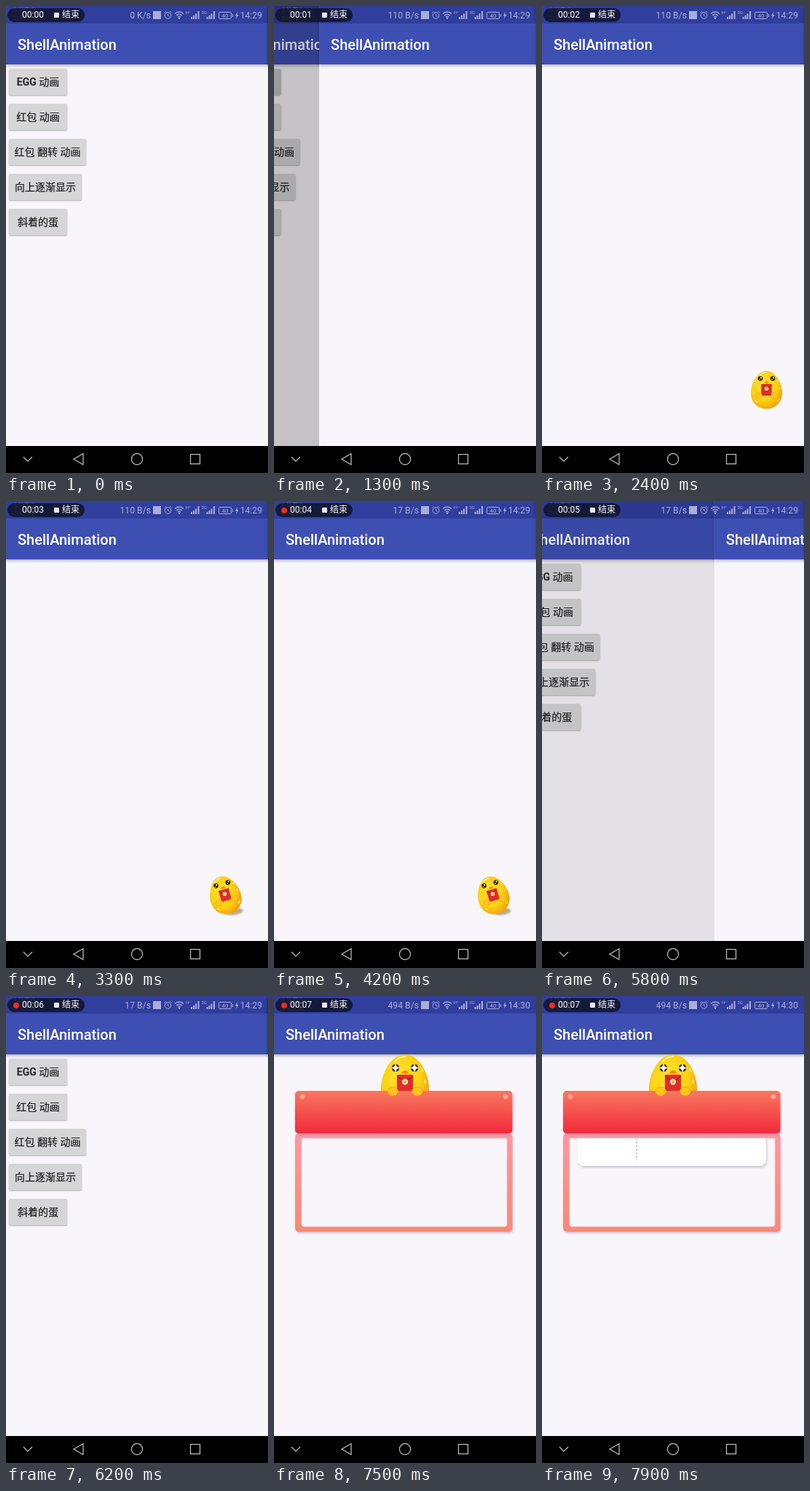
An HTML page that plays this animation: 360x640 px, repeating every 8 s.

```html
<!DOCTYPE html>
<html lang="zh-CN">
<head>
<meta charset="utf-8">
<title>ShellAnimation</title>
<style>
  html, body { margin: 0; width: 100%; height: 100%; overflow: hidden; background: #000; }
  body { font-family: Roboto, "Noto Sans CJK SC", "Noto Sans CJK", sans-serif; }
  #stage { position: relative; width: 360px; height: 640px; overflow: hidden; background: #000; }
  #screen { position: absolute; inset: 0 0 37px; overflow: hidden; }
  svg { position: absolute; left: 0; top: 0; overflow: visible; }

  .page {
    position: absolute; inset: 0; background: #f8f6fa;
    animation: 8s cubic-bezier(.333, .667, .667, 1) infinite;
  }
  .bar { position: absolute; width: 360px; height: 80px; background: #3e4fb3; box-shadow: 0 2px 4px rgba(0, 0, 0, .28); }
  .bar::before { content: ""; position: absolute; width: 100%; height: 24px; background: #303e9d; }
  .bar span { position: absolute; left: 16px; top: 41px; font: 500 20px/24px Roboto, sans-serif; color: #fff; }

  .home { animation-name: recede; }
  .dim { position: absolute; inset: 0; background: #000; animation: dim 8s cubic-bezier(.333, .667, .667, 1) infinite; }
  .egg-page { animation-name: visit; }
  .card-page { animation-name: arrive; }

  .btn {
    position: absolute; left: 4px; width: 80px; height: 36px; border-radius: 2px;
    background: #d6d5d8; color: #1d1d1f; font-size: 14px; font-weight: 500; line-height: 37px;
    text-align: center; white-space: nowrap; box-shadow: 0 1px 2px rgba(0, 0, 0, .3);
    -webkit-text-stroke: .2px #1d1d1f;
  }
  .first { animation: press-first 8s infinite; }
  .second { animation: press-second 8s infinite; }
  .slot { animation: drop 8s linear infinite; }
  .soft { filter: drop-shadow(1px 2px 1.5px rgba(140, 120, 175, .45)); }
  #shade { filter: blur(1px); }

  @keyframes recede {
    0%, 11% { transform: none; }
    20%, 69.4% { transform: translateX(-90px); }
    76.9%, 82% { transform: none; }
    91.5%, 100% { transform: translateX(-90px); }
  }
  @keyframes dim {
    0%, 11% { opacity: 0; }
    20%, 69.4% { opacity: .25; }
    76.9%, 82% { opacity: 0; }
    91.5%, 100% { opacity: .25; }
  }
  @keyframes visit {
    0%, 11% { transform: translateX(360px); }
    20%, 69.4% { transform: none; }
    76.9%, 100% { transform: translateX(360px); }
  }
  @keyframes arrive {
    0%, 82% { transform: translateX(360px); }
    91.5%, 100% { transform: none; }
  }
  @keyframes press-first {
    0%, 8.5% { background: #d6d5d8; }
    11%, 22% { background: #c4c3c6; }
    25%, 100% { background: #d6d5d8; }
  }
  @keyframes press-second {
    0%, 79.5% { background: #d6d5d8; }
    82%, 100% { background: #c4c3c6; }
  }
  @keyframes drop {
    0%, 93.75% { transform: translateY(-32px); }
    100% { transform: translateY(19px); }
  }

  .status { position: absolute; top: 5px; font: 12.2px/16px Roboto, sans-serif; color: #a9afd7; white-space: nowrap; }
  #speed { right: 161px; }
  #hour { right: 8px; }
  .carrier { position: absolute; left: 9px; top: 2px; font-size: 8px; line-height: 10px; color: #8d8f9f; }
  #pill {
    position: absolute; left: 2px; top: 3px; width: 106px; height: 19px; border-radius: 10px;
    background: rgba(17, 20, 42, .86); color: #fff; font-size: 12px; line-height: 19px;
  }
  #pill > * { position: absolute; }
  #dot { left: 8px; top: 5.5px; width: 8px; height: 8px; border-radius: 50%; background: #f3291f; }
  #clock { left: 20px; }
  .stop { left: 64px; top: 6px; width: 7px; height: 7px; border-radius: 1px; background: #e8e8ee; }
  .end { left: 75px; }
</style>
</head>
<body>
<div id="stage">
  <svg width="0" height="0">
    <defs>
      <radialGradient id="yolk" cx=".42" cy=".4" r=".62">
        <stop offset="0" stop-color="#ffe52f"/>
        <stop offset=".65" stop-color="#fdd012"/>
        <stop offset="1" stop-color="#f3a30d"/>
      </radialGradient>
      <linearGradient id="red" x2="0" y2="1">
        <stop offset="0" stop-color="#f9785f"/>
        <stop offset="1" stop-color="#f0293b"/>
      </linearGradient>
      <linearGradient id="coral" x2="0" y2="1">
        <stop offset="0" stop-color="#fc989f"/>
        <stop offset="1" stop-color="#f68a77"/>
      </linearGradient>
      <clipPath id="window"><path d="M38 195h282v121H38z"/></clipPath>
      <g id="eye">
        <circle r="3.3" fill="#35200f"/>
        <circle cx="1" cy="-1" r="1.1" fill="#fff"/>
        <circle cx="-1" cy="1.3" r=".7" fill="#fff"/>
      </g>
      <g id="star-eye">
        <circle r="3.4" fill="#35200f"/>
        <path d="M0-4l1.200 2.800L4 0 1.200 1.200 0 4l-1.200-2.800L-4 0l2.800-1.200z" fill="#fff"/>
      </g>
      <g id="paws" fill="#fcc51d" stroke="#e9a116" stroke-width=".5">
        <ellipse cx="-11" cy="7" rx="4.8" ry="4"/>
        <ellipse cx="11" cy="7" rx="4.8" ry="4"/>
      </g>
      <g id="body">
        <path d="M0-26C13-26 21.5-8 21.5 4 21.5 18 12 26 0 26S-21.5 18-21.5 4C-21.5-8-13-26 0-26z" fill="url(#yolk)"/>
        <path d="M-9-20q4-4 9-4M15-13l1 2M17 13l-2 3M-15 15l2 2M18-3v2" fill="none" stroke="#fff3b8" stroke-width="1.2" stroke-linecap="round"/>
        <path d="M-3.500-10q3.500-3.500 7 0-3.500 2.500-7 0z" fill="#f58a13"/>
      </g>
      <g id="packet">
        <rect x="-7.2" y="-8" width="14.4" height="16" rx="1.2" fill="#e02d2e"/>
        <path d="M-7.200-7Q0 1 7.200-7" fill="none" stroke="#a91b20" stroke-width=".8"/>
        <circle cy="-1.6" r="2.7" fill="#fbe6b0"/>
        <circle cy="-1.6" r="1.2" fill="#dfa13c"/>
      </g>
      <g id="egg">
        <use href="#body"/>
        <use href="#eye" x="-8.5" y="-15.500"/>
        <use href="#eye" x="8.5" y="-15.500"/>
        <use href="#packet"/>
        <use href="#paws" x="0" y="1"/>
      </g>
    </defs>
  </svg>

  <div id="screen">
    <div class="page home">
      <div class="bar"><span>ShellAnimation</span></div>
      <div class="btn first" style="top:86px">EGG 动画</div>
      <div class="btn second" style="top:134px">红包 动画</div>
      <div class="btn" style="top:182px;width:106px">红包 翻转 动画</div>
      <div class="btn" style="top:230px;width:100px">向上逐渐显示</div>
      <div class="btn" style="top:278px">斜着的蛋</div>
      <div class="dim"></div>
    </div>

    <div class="page egg-page">
      <div class="bar"><span>ShellAnimation</span></div>
      <svg id="nest" width="360" height="603">
        <ellipse id="shade" rx="13" ry="5" fill="#b39d72"/>
        <use id="hopper" href="#egg"/>
      </svg>
    </div>

    <div class="page card-page">
      <div class="bar"><span>ShellAnimation</span></div>
      <svg width="360" height="603">
        <g transform="translate(180 120) scale(1.535)">
          <use href="#body"/>
          <use href="#star-eye" x="-8.5" y="-14"/>
          <use href="#star-eye" x="8.5" y="-14"/>
          <use href="#packet"/>
        </g>
        <g class="soft">
          <rect x="29" y="188.500" width="298.500" height="134.500" rx="5" fill="url(#coral)"/>
          <path d="M38 195h282v118q0 3-3 3H41q-3 0-3-3z" fill="#f8f6fa" stroke="#e8cfd8"/>
        </g>
        <g clip-path="url(#window)">
          <g class="slot">
            <path class="soft" d="M49 120H308V220q-4 0-4 4H53q0-4-4-4z" fill="#fff"/>
            <path d="M130 120v96" stroke="#b79a9d" stroke-dasharray="3 2"/>
          </g>
        </g>
        <rect class="soft" x="29" y="130" width="298.500" height="58.500" rx="5" fill="url(#red)"/>
        <g fill="#fba99c" stroke="#f58f86">
          <circle cx="39" cy="138" r="3.2"/>
          <circle cx="318" cy="138" r="3.2"/>
        </g>
        <use href="#paws" transform="translate(180 120) scale(1.535)"/>
      </svg>
    </div>
  </div>

  <div class="carrier">本地网络<br>本地网络</div>
  <div id="pill">
    <i id="dot"></i><span id="clock">00:00</span><i class="stop"></i><span class="end">结束</span>
  </div>
  <div class="status" id="speed">0 K/s</div>
  <div class="status" id="hour">14:29</div>

  <svg width="360" height="640" fill="none" stroke="#a9afd7">
    <rect x="202" y="7" width="11" height="11" fill="#a9afd7" stroke="none"/>
    <circle cx="222.5" cy="13" r="4.3"/>
    <path d="M222.5 10.5V13l2 1.5M217.5 9.5l2.5-2.3M227.5 9.5L225 7.2"/>
    <path d="M232 10.5q6-5 12 0M234 13q4-3.4 8 0M236 15.3q2-1.6 4 0" stroke-width="1.3"/>
    <circle cx="238" cy="17" r=".7" fill="#a9afd7"/>
    <path id="bars" d="M255 18v-3M258 18v-5M261 18V10.500M264.500 18V7" stroke-width="2"/>
    <use href="#bars" x="21.5"/>
    <rect x="292.500" y="8.500" width="17" height="9" rx="1"/>
    <path d="M311.500 11v4"/>
    <path d="M318 8l-3 5.500h2l-1 4.500 3.500-6h-2z" fill="#a9afd7" stroke="none"/>
    <g fill="#a9afd7" stroke="none" font-family="Roboto, sans-serif">
      <text x="247" y="11" font-size="6">H⁺</text>
      <text x="268.500" y="11" font-size="6">3G</text>
      <text x="296.500" y="16" font-size="8">40</text>
    </g>
    <g stroke="#c3c3c3" stroke-width="1.2">
      <path d="M24 618l6 6 6-6M106 613.500v15L93 621z"/>
      <circle cx="180" cy="621" r="7.600"/>
      <rect x="253.500" y="614.500" width="13" height="13"/>
    </g>
  </svg>
</div>

<script>
  const LOOP = 8000, HOP = 900, EGG_SHOWN = 1650;
  const el = id => document.getElementById(id);
  const setText = (id, text) => { if (el(id).textContent !== text) el(id).textContent = text; };

  // -1 leans left, 1 leans right, 0 is the upright top of a hop
  function lean(t) {
    if (t < 2625) return 0;
    const swing = -1.6 * Math.cos(2 * Math.PI * (t - 4200) / HOP);
    return Math.max(-1, Math.min(1, swing));
  }

  function poseEgg(t) {
    const k = lean(t), landed = Math.abs(k);
    const x = 308.5 + 7.5 * k, y = 526 + 14 * landed;
    el('nest').style.opacity = t < EGG_SHOWN ? 0 : 1;
    el('hopper').setAttribute('transform', `translate(${x} ${y}) rotate(${16 * k})`);
    el('shade').setAttribute('transform', `translate(${308.5 - 4 * k} 562.5) rotate(${5 * k})`);
    el('shade').setAttribute('opacity', Math.max(0, landed * 2 - 1) * .85);
  }

  function speedAt(t) {
    return t < 500 ? '0 K/s' : t < 3500 ? '110 B/s' : t < 6500 ? '17 B/s' : '494 B/s';
  }

  const start = performance.now();
  function draw() {
    const t = (performance.now() - start) % LOOP;
    const blink = t % 1200;
    poseEgg(t);
    setText('clock', '00:0' + Math.max(0, Math.floor((t - 150) / 1000)));
    setText('speed', speedAt(t));
    setText('hour', t < 7000 ? '14:29' : '14:30');
    el('dot').style.opacity = blink > 150 && blink < 750 ? 1 : 0;
    requestAnimationFrame(draw);
  }
  draw();
</script>
</body>
</html>
```
